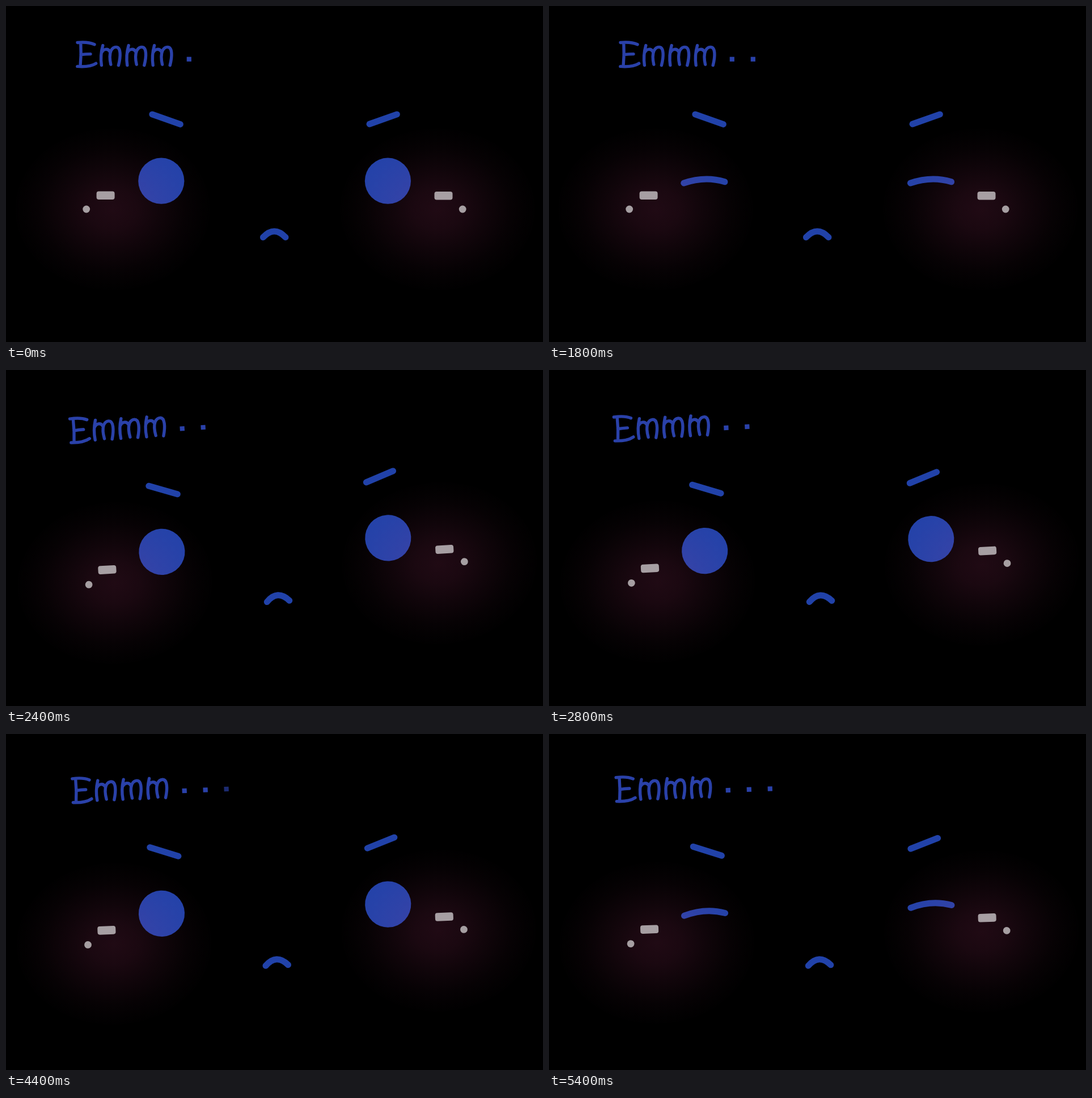
Animation, 947 px wide and 592 px high, one loop 5.6 s. Source, as an HTML page with a canvas:

```html
<!DOCTYPE html>
<html lang="en">
<head>
<meta charset="utf-8">
<title>Emmm...</title>
<style>
  html, body { margin: 0; width: 100%; height: 100%; overflow: hidden; background: #000; }
  canvas { display: block; }
</style>
</head>
<body>
<canvas id="stage" width="947" height="592" role="img" aria-label="Emmm..."></canvas>
<script>
const W = 947, H = 592, STEP = 200, LOOP = 5600;
const BLUE = '#2142a9', INK = '#2a41a9';
const EYES = [273.8, 673.4];
const ctx = document.getElementById('stage').getContext('2d');

const LETTER_E = new Path2D(
  'M126 64.5 C137 63.4 148 64.2 156 67.8 M131.8 65 Q133 86 131 106 ' +
  'M132 85.6 Q141 84.6 149 84.6 M125.8 106.4 C139 107.4 151 106 158.6 101.2');
const LETTER_M = new Path2D(
  'M170.8 69.5 Q165.8 87 168.4 104.3 M169 81.5 C172 75.5 180 74 183.2 80.5 ' +
  'M184.8 103 Q181.4 88 185 79 Q188.4 72.4 194 72.4 C203 72.4 202.4 89 198.4 104.5');
const MOUTH = new Path2D('M453.4 407.6 C466.4 393.5 479.8 393.5 493 407.6');
const BROWS = new Path2D('M257.8 190.9 L307.4 208.4 M641 208 L689.4 190.9');

const clamp = v => Math.max(0, Math.min(1, v));

// Head tilt in degrees: upright, then snaps over and slowly recovers
function tilt(k) {
  if (k < 10) return 0;
  if (k < 14) return 4 - (k - 10) / 4;
  return 3 - Math.min(k - 14, 12) / 12;
}

function dotAlphas(k) {
  const second = clamp(k / 2);
  const third = k < 10 ? clamp(1 - Math.abs(k - 4) / 2) : clamp((k - 14) / 12);
  return [1, second, third];
}

function stroke(path, color, width) {
  ctx.strokeStyle = color;
  ctx.lineWidth = width;
  ctx.stroke(path);
}

function circle(x, y, r) {
  ctx.beginPath();
  ctx.arc(x, y, r, 0, Math.PI * 2);
  ctx.fill();
}

function drawText(k) {
  stroke(LETTER_E, INK, 5.4);
  for (let i = 0; i < 3; i++) {
    ctx.save();
    ctx.translate(i * 45.4, 0);
    stroke(LETTER_M, INK, 5.4);
    ctx.restore();
  }
  ctx.fillStyle = INK;
  dotAlphas(k).forEach((alpha, i) => {
    ctx.globalAlpha = alpha;
    ctx.fillRect(318.7 + i * 37, 89.6, 8.2, 8.2);
  });
  ctx.globalAlpha = 1;
}

function drawEye(x, closed) {
  if (closed) {
    ctx.beginPath();
    ctx.moveTo(x - 36, 312);
    ctx.quadraticCurveTo(x + 1.4, 299.2, x + 36.2, 309.8);
    ctx.strokeStyle = BLUE;
    ctx.lineWidth = 11;
    ctx.stroke();
  } else {
    ctx.fillStyle = BLUE;
    circle(x, 308.2, 40.6);
  }
}

function drawCheek(x) {
  const glow = ctx.createRadialGradient(0, 0, 0, 0, 0, 172);
  [[0, .132], [.25, .11], [.5, .065], [.75, .027], [.9, .012], [1, .005]].forEach(([at, a]) =>
    glow.addColorStop(at, `rgba(240,75,150,${a})`));
  ctx.save();
  ctx.translate(x, 358);
  ctx.scale(1, .83);
  ctx.fillStyle = glow;
  circle(0, 0, 172);
  ctx.restore();
}

function drawShine(barX, barY, dotX) {
  ctx.fillStyle = 'rgba(255,255,255,.61)';
  ctx.beginPath();
  ctx.roundRect(barX, barY, 32, 14.6, 4);
  ctx.fill();
  circle(dotX, 358, 6.4);
}

function draw(time) {
  const k = Math.floor((time % LOOP) / STEP);
  const closed = k === 9 || k === 27;
  ctx.fillStyle = '#000';
  ctx.fillRect(0, 0, W, H);
  ctx.lineCap = ctx.lineJoin = 'round';
  ctx.save();
  ctx.translate(W / 2, H / 2);
  ctx.rotate(-tilt(k) * Math.PI / 180);
  ctx.translate(-W / 2, -H / 2);
  drawText(k);
  stroke(BROWS, BLUE, 11);
  stroke(MOUTH, BLUE, 11);
  EYES.forEach(x => drawEye(x, closed));
  drawCheek(188);
  drawCheek(761);
  drawShine(159.6, 326.5, 141.7);
  drawShine(755.5, 326.9, 805.2);
  ctx.restore();
}

const start = performance.now();
function tick() {
  draw(performance.now() - start);
  requestAnimationFrame(tick);
}
tick();
</script>
</body>
</html>
```
